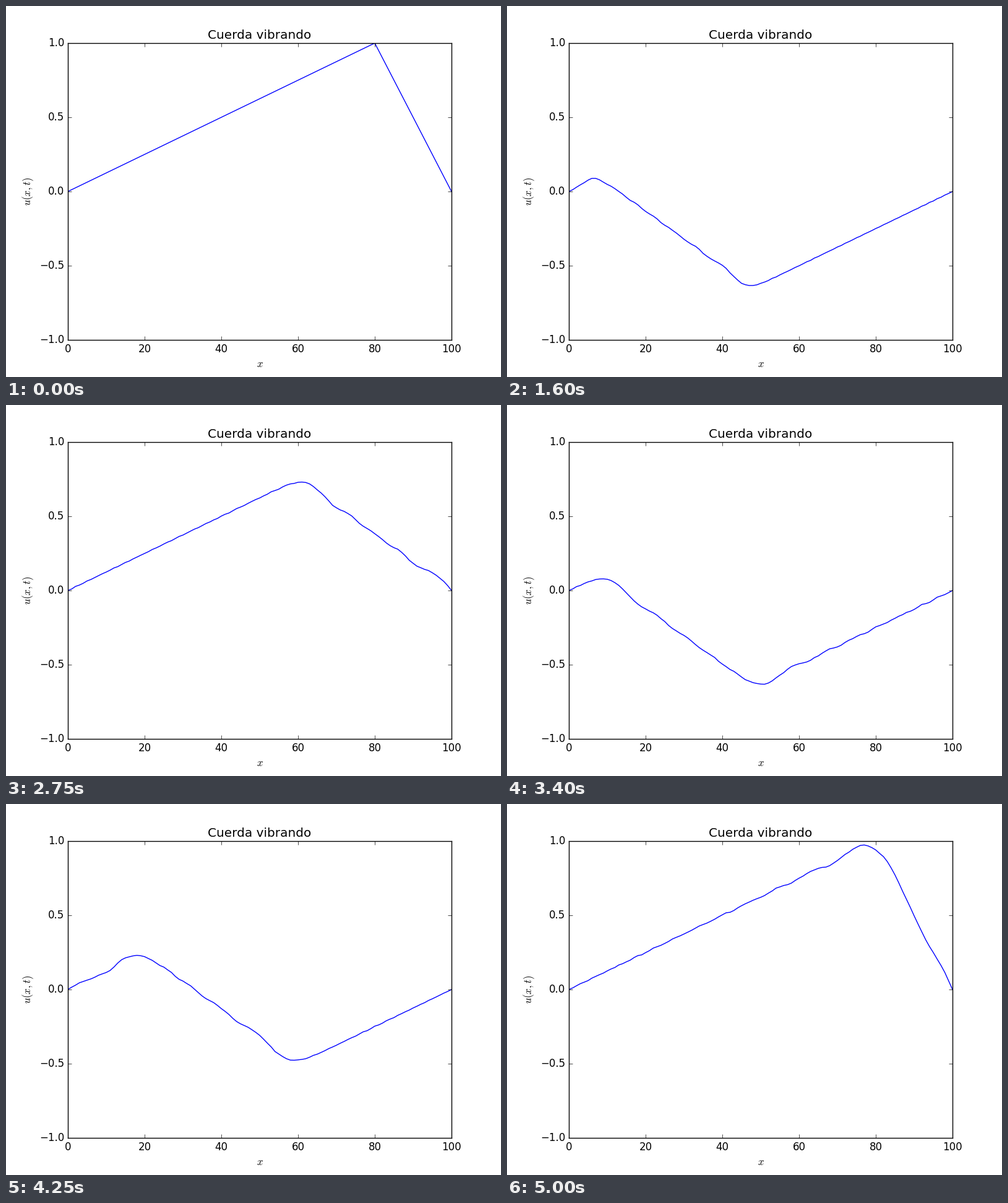
Recreate the animation shown at these times as a matplotlib script. Size 800 by 600 pixels, loop 5.05 s.

```python
import numpy as np
import matplotlib.pyplot as plt
from matplotlib.animation import FuncAnimation

plt.style.use("classic")
plt.rcParams["font.family"] = "DejaVu Sans"

FRAMES = 101
STEPS = 10        # time steps per frame
COURANT = 0.4     # c * dt / dx


def pluck(x):
    """String pulled up to height 1 at x = 80."""
    return np.where(x <= 80, x / 80, (100 - x) / 20)


def vibrate(u0):
    """Explicit finite differences for the wave equation, starting at rest."""
    old, now = u0.copy(), u0.copy()
    shapes = [u0.copy()]
    for step in range(1, (FRAMES - 1) * STEPS + 1):
        if step > 1:
            new = np.zeros_like(now)
            bend = now[2:] - 2 * now[1:-1] + now[:-2]
            new[1:-1] = 2 * now[1:-1] - old[1:-1] + COURANT**2 * bend
            old, now = now, new
        if step % STEPS == 0:
            shapes.append(now.copy())
    return shapes


x = np.arange(101.0)
shapes = vibrate(pluck(x))

fig = plt.figure(figsize=(8, 6), dpi=100, facecolor="white")
ax = fig.add_axes([0.125, 0.1, 0.775, 0.8])
ax.set_xlim(0, 100)
ax.set_ylim(-1, 1)
ax.set_xticks(np.arange(0, 101, 20))
ax.set_yticks(np.arange(-1, 1.1, 0.5))
ax.set_title("Cuerda vibrando")
ax.set_xlabel("$x$")
ax.set_ylabel("$u(x,t)$")
line, = ax.plot(x, shapes[0], color="b", linewidth=1)


def draw(i):
    line.set_ydata(shapes[i])
    return line,


def start():
    return draw(0)


anim = FuncAnimation(fig, draw, frames=FRAMES, init_func=start,
                     interval=50, repeat=True, repeat_delay=0)
plt.show()
```
